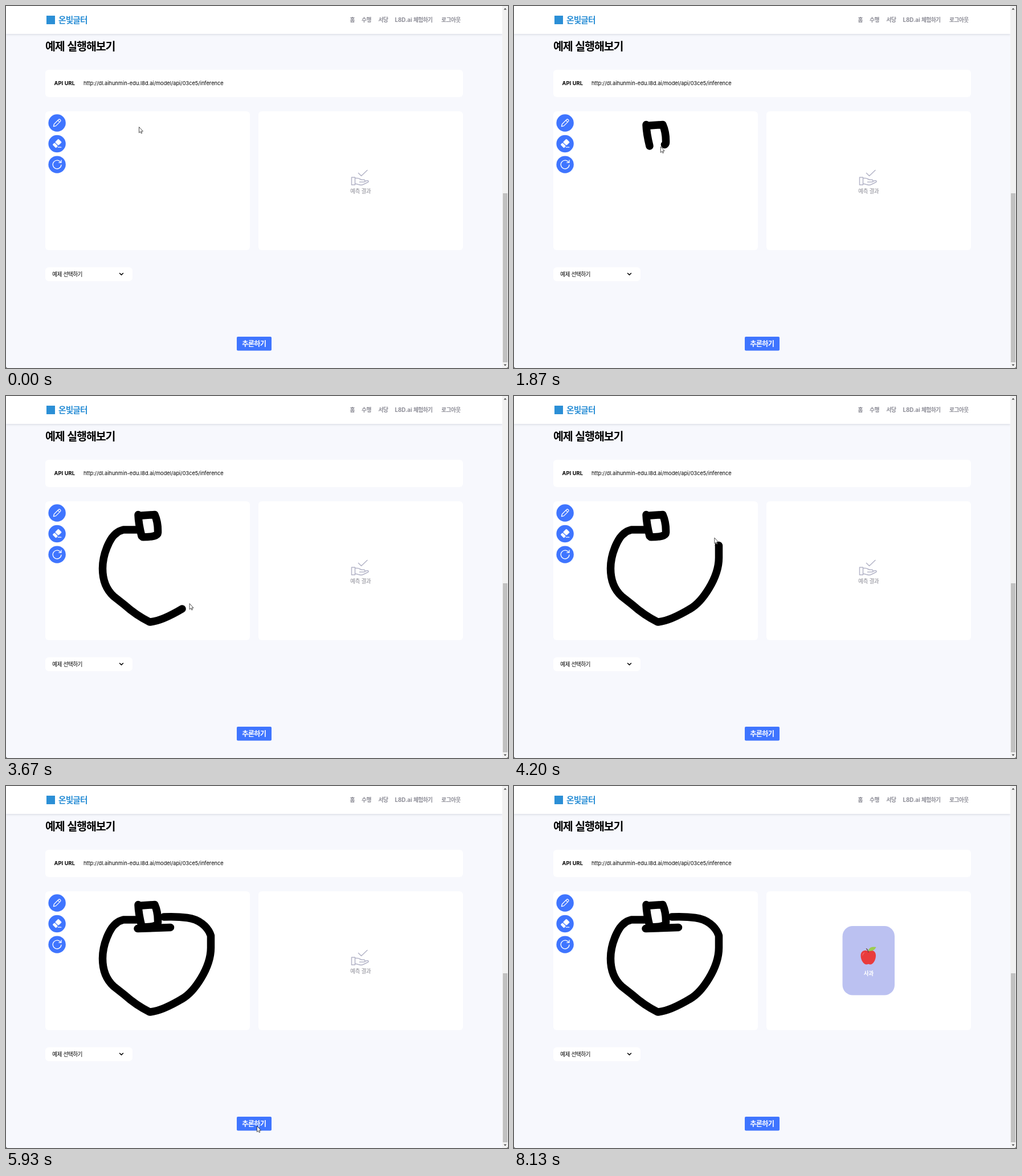
An HTML page for the animation above (8.34 s loop, 881 by 636 pixels).

```html
<!DOCTYPE html>
<html lang="ko">
<head>
<meta charset="utf-8">
<title>예제 실행해보기</title>
<style>
  html, body { margin: 0; width: 100%; height: 100%; overflow: hidden; background: #f7f8fd; }
  svg { display: block; width: 881px; height: 636px; }
  text {
    font: 700 9.76px Inter, "Noto Sans CJK KR", "Noto Sans CJK", sans-serif;
    letter-spacing: -.06em; word-spacing: .07em;
  }
  .latin { font-size: 9.24px; letter-spacing: 0; }
  .grey { fill: #8c8c96; }
  .line { fill: none; stroke-linecap: round; stroke-linejoin: round; }
  .card { fill: #fff; }
  #header { filter: drop-shadow(0 1px 2px rgba(40, 45, 70, .16)); }
</style>
</head>
<body>
<svg viewBox="0 0 881 636">
  <rect width="881" height="636" fill="#f7f8fd"/>

  <rect id="header" width="871" height="49" fill="#fff"/>
  <rect x="71" y="17" width="15" height="15" fill="#2b8fd6"/>
  <text x="92" y="30" fill="#2b8fd6" style="font-size:14.7px">온빛글터</text>
  <g class="grey">
    <text x="603.5" y="27.6">홈</text>
    <text x="624" y="27.6">수행</text>
    <text x="653.5" y="27.6">서당</text>
    <text x="682.5" y="27.6"><tspan letter-spacing="0">L8D.ai</tspan> 체험하기</text>
    <text x="764" y="27.6">로그아웃</text>
  </g>

  <text x="69" y="78.2" style="font-size:19.5px">예제 실행해보기</text>

  <rect class="card" x="69" y="112" width="733" height="48" rx="6"/>
  <text class="latin" x="84.5" y="139">API URL</text>
  <text class="latin" x="136" y="139" style="font-weight:400">http://dl.aihunmin-edu.l8d.ai/model/api/03ce5/inference</text>

  <rect class="card" x="69" y="185" width="359" height="244" rx="6"/>
  <rect class="card" x="443" y="185" width="359" height="244" rx="6"/>

  <g fill="#3f75ff">
    <circle cx="89.6" cy="205.5" r="15.2"/>
    <circle cx="89.6" cy="242" r="15.2"/>
    <circle cx="89.6" cy="278.6" r="15.2"/>
    <rect x="405" y="581" width="61" height="24.4" rx="2"/>
  </g>
  <g class="line" stroke="#fff" stroke-width="1.3">
    <path transform="translate(89.6 205.5)" d="M-6.2 6.2l1-4.2 8-8q1.2-1 2.4 0l.7.7q1 1.2 0 2.4l-8 8zM1.4-4.6l3 3"/>
    <g transform="translate(89.8 241.4)">
      <path d="M1.5 6.8h5.5"/>
      <g transform="rotate(-45)" fill="#fff" stroke="none">
        <rect x="-1.2" y="-4.3" width="8.4" height="8.6" rx="1.3"/>
        <rect x="-7.4" y="-4.3" width="5" height="8.6" rx="1.3"/>
      </g>
    </g>
    <path transform="translate(89.6 278.6)" d="M6.5-3.6A7.4 7.4 0 1 0 7.4.5M7.4-7.6v4.2h-4.2"/>
  </g>

  <g id="waiting">
    <path class="line" stroke="#b4b5c8" stroke-width="1.5" d="M618.5 293.5l5 5 10.5-10M606.5 301h6v13.2h-6zM612.5 302.5h4c4 0 5 2.7 8 2.7h3.5a2 2 0 0 1 0 4h-7.5M630 308l4-1.2c2.5-.2 3 2 .8 3l-8.8 4.2q-3 1-6 0l-7.5-2"/>
    <text class="grey" x="604" y="329.3" style="font-weight:500">예측 결과</text>
  </g>
  <g id="result">
    <rect x="576.5" y="246" width="91.5" height="121.5" rx="18" fill="#bbc1f1"/>
    <path fill="#e93b3c" d="M622 290.5c4-2.8 13-2.3 13 7.5 0 8-5 15.5-9.5 15.5-1.7 0-2.2-.8-3.5-.8s-2 .8-3.7.8c-4.5 0-9.8-7.5-9.8-15.5 0-9.8 9.5-10.3 13.5-7.5z"/>
    <path fill="#f4696a" d="M611.5 299c-.5-4 1.5-6.5 4.5-6.8-2 1.8-3.5 4-4.5 6.8z"/>
    <path class="line" stroke="#6b4034" stroke-width="1.4" d="M618.5 286q3 2 3.3 6"/>
    <path fill="#9ccc52" d="M621.5 289.5c1.5-6 7-7.5 14-6.5-2.5 5.5-8 8-14 6.5z"/>
    <text x="613.8" y="333" fill="#fff">사과</text>
  </g>

  <rect class="card" x="69" y="459" width="153" height="24.5" rx="6"/>
  <text x="81" y="474.5" style="font-weight:500">예제 선택하기</text>
  <path class="line" stroke="#000" stroke-width="1.5" d="M199.500 469.500l3 3 3-3"/>
  <text x="414.3" y="598" fill="#fff" style="font-size:12.2px">추론하기</text>

  <rect x="871" width="10" height="636" fill="#f1f1f1"/>
  <rect x="872" y="329" width="8" height="297" fill="#c1c1c1"/>
  <path fill="#505050" d="M873.5 6.5l2.500-3 2.500 3zM873.5 629.5l2.500 3 2.500-3z"/>
  <path fill="#444" d="M0 633q0 3 3 3H0zM881 633q0 3-3 3h3z"/>

  <g id="ink" class="line" stroke="#000" stroke-width="13.5"></g>
  <path id="cursor" fill="#fff" stroke="#222" stroke-width=".8" d="M.5.5v10.300l2.300-2.100 1.500 3.200 1.500-.7-1.500-3.100h3.100z"/>
</svg>

<script>
const LOOP = 8340, FPS = 15, INK_LAG = 67;
const el = id => document.getElementById(id);
const show = (node, on) => node.setAttribute("visibility", on ? "visible" : "hidden");

// Each gesture runs at an even speed; the pointer glides straight from one to the next.
const gesture = (start, end, d, pen = false) => {
  const path = document.createElementNS("http://www.w3.org/2000/svg", "path");
  path.setAttribute("d", d);
  if (pen) el("ink").append(path);
  const length = path.getTotalLength();
  const progress = t => Math.min(1, Math.max(0, (t - start) / (end - start)));
  return { start, end, path, pen, length, progress, at: k => path.getPointAtLength(k * length) };
};

const gestures = [
  gesture(0, 130, "M233 212L232 208"),
  gesture(460, 960, "M232 208.5Q232.5 224 238 246", true),
  gesture(1330, 2000, "M238 210L261 208.5Q267 222 266.5 240Q266 248 240 247.8", true),
  gesture(2130, 2270, "M240 235H235"),
  gesture(2470, 2780, "M235 235H206Q198 237 192.500 242", true),
  gesture(2780, 3600, "M192.500 242C182 250 169.500 278 169.500 303C169.500 325 177 341 189 352L208 367Q228 385 252 397Q272 396 309 374", true),
  gesture(3600, 4530, "M309 374C330 362 359.500 320 359.500 284V263C354 246 338 234 318 231.500Q300 229 277 230", true),
  gesture(4800, 5000, "M231 250.500L288.500 248.500", true),
  gesture(5240, 5930, "M288.500 248.500Q340 400 440 597"),
  gesture(6030, 6330, "M440 597L650 570"),
  gesture(7340, 7400, "M650 570L604 585"),
  gesture(7930, 8130, "M47 630V634")
];

function pointer(t) {
  const next = gestures.findIndex(g => t < g.end);
  if (next < 0) return gestures[gestures.length - 1].at(1);
  const g = gestures[next];
  if (t >= g.start) return g.at(g.progress(t));
  const prev = gestures[next - 1], a = prev.at(1), b = g.at(0);
  const k = (t - prev.end) / (g.start - prev.end);
  return { x: a.x + (b.x - a.x) * k, y: a.y + (b.y - a.y) * k };
}

function draw(t) {
  for (const g of gestures.filter(g => g.pen)) {
    const k = g.progress(t - INK_LAG);
    show(g.path, k > 0);
    g.path.setAttribute("stroke-dasharray", k < 1 ? `${k * g.length} ${g.length * 2}` : "none");
  }

  const { x, y } = pointer(t);
  el("cursor").setAttribute("transform", `translate(${x} ${y})`);
  show(el("cursor"), t < 7460 || (t > 7925 && t < 8125));

  const solved = t > 6060;
  show(el("result"), solved);
  show(el("waiting"), !solved);
}

const start = performance.now();
function tick() {
  const t = (performance.now() - start) % LOOP;
  draw(Math.floor((t + 4) * FPS / 1000) * 1000 / FPS);
  requestAnimationFrame(tick);
}
tick();
</script>
</body>
</html>
```
